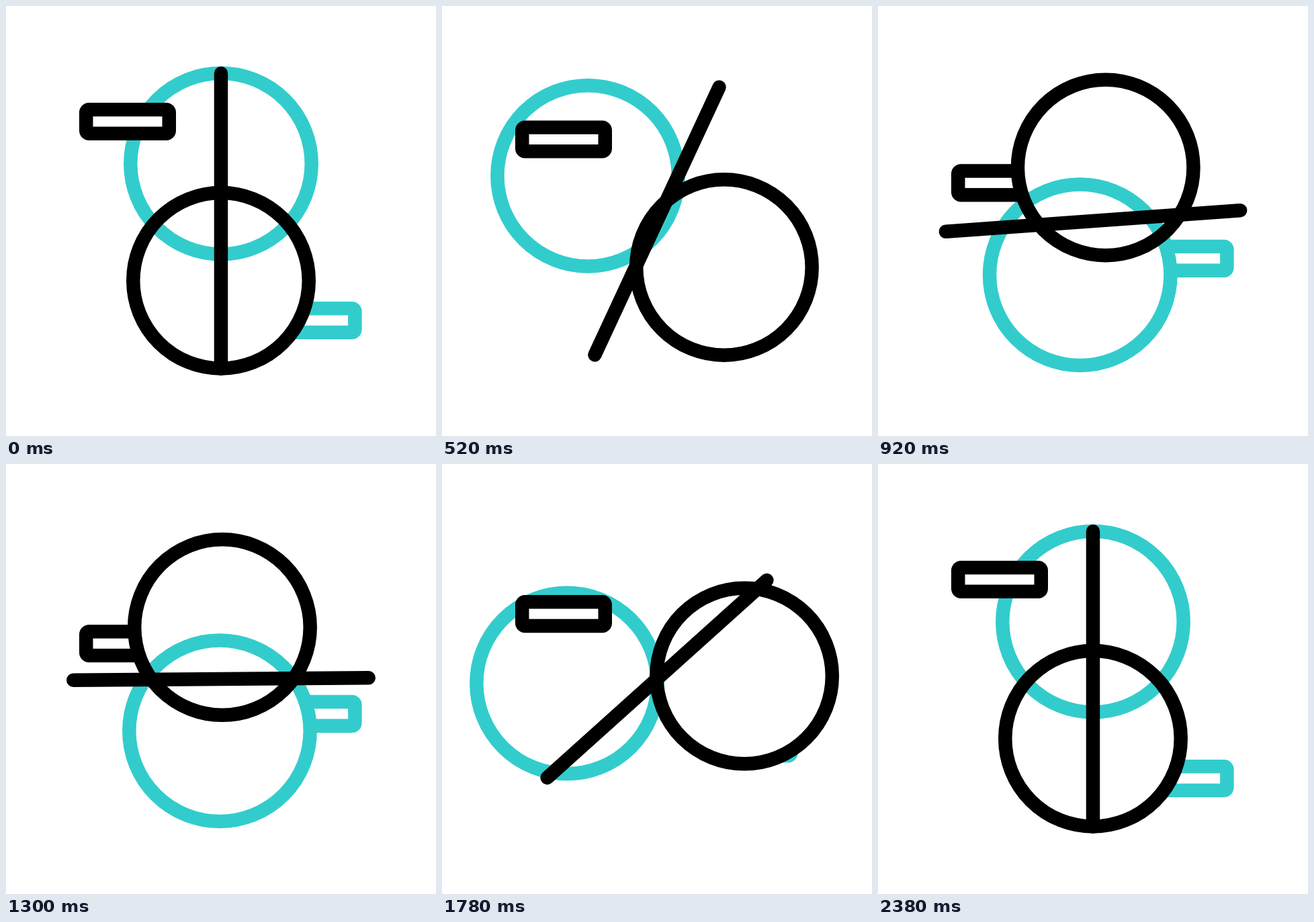
Write an HTML page with a canvas that moves like this. It is 640 px wide and 640 px high and loops after 2400 ms.

```html
<!DOCTYPE html>
<html lang="en">
<head>
<meta charset="utf-8">
<title>Swinging circles</title>
<style>
  html, body { margin: 0; width: 100%; height: 100%; overflow: hidden; background: #fff; }
  canvas { display: block; width: 640px; height: 640px; }
</style>
</head>
<body>
<canvas id="stage" width="640" height="640"></canvas>
<script>
const ctx = document.getElementById('stage').getContext('2d');
const TEAL = '#33cccc', BLACK = '#000', WHITE = '#fff';
const LOOP = 2400, STEP = 20, TURN = 1200, REST = 2380;
const STROKE = 20.5, CENTER = 320, TAU = Math.PI * 2;

const mix = (a, b, k) => a + (b - a) * k;

// Cubic bezier easing (.75, 0, .25, 1), solved by bisection.
function ease(x) {
  let lo = 0, hi = 1;
  for (let i = 0; i < 30; i++) {
    const t = (lo + hi) / 2, u = 1 - t;
    const bx = 2.25 * u * u * t + 0.75 * u * t * t + t * t * t;
    if (bx < x) lo = t; else hi = t;
  }
  return lo * lo * (3 - 2 * lo);
}

function progress(ms) {
  if (ms <= TURN) return ease(ms / TURN);
  return 1 - ease(Math.min(1, (ms - TURN) / (REST - TURN)));
}

// A disc swings half a turn about a point on its rim while that point slides.
function swing(radius, fromY, toY, side, k) {
  const angle = Math.PI * k;
  return {
    x: CENTER + side * radius * Math.sin(angle),
    y: mix(fromY, toY, k) + side * radius * Math.cos(angle),
    r: radius
  };
}

function fillDisc(c) {
  ctx.beginPath();
  ctx.arc(c.x, c.y, c.r, 0, TAU);
  ctx.fillStyle = WHITE;
  ctx.fill();
}

function strokeRing(c, color) {
  ctx.beginPath();
  ctx.arc(c.x, c.y, c.r, 0, TAU);
  ctx.strokeStyle = color;
  ctx.stroke();
}

function drawBar(x, midY, color) {
  const w = 144, h = 56.2, y = midY - h / 2;
  ctx.beginPath();
  ctx.roundRect(x, y, w, h, 14.5);
  ctx.fillStyle = color;
  ctx.fill();
  ctx.fillStyle = WHITE;
  ctx.fillRect(x + STROKE, y + STROKE, w - 2 * STROKE, h - 2 * STROKE);
}

function drawLine(k) {
  const angle = k * Math.PI / 2, half = 219.75;
  const dx = half * Math.sin(angle), dy = half * Math.cos(angle);
  ctx.beginPath();
  ctx.moveTo(CENTER + dx, CENTER - dy);
  ctx.lineTo(CENTER - dx, CENTER + dy);
  ctx.strokeStyle = BLACK;
  ctx.stroke();
}

function draw(ms) {
  const k = progress(ms);
  const tealDisc = swing(134.7, 369.45, 262.1, -1, k);
  const blackDisc = swing(130.75, 278, 374.25, 1, k);

  ctx.fillStyle = WHITE;
  ctx.fillRect(0, 0, 640, 640);
  ctx.lineWidth = STROKE;
  ctx.lineCap = 'round';

  drawBar(385.6, mix(468, 371.4, k), TEAL);
  fillDisc(tealDisc);
  fillDisc(blackDisc);
  strokeRing(tealDisc, TEAL);

  // The black bar only shows outside the black disc.
  ctx.save();
  ctx.beginPath();
  ctx.rect(0, 0, 640, 640);
  ctx.arc(blackDisc.x, blackDisc.y, blackDisc.r, 0, TAU);
  ctx.clip('evenodd');
  drawBar(109, mix(172, 267.7, k), BLACK);
  ctx.restore();

  strokeRing(blackDisc, BLACK);
  drawLine(k);
}

function tick() {
  draw(Math.floor(performance.now() % LOOP / STEP) * STEP);
  requestAnimationFrame(tick);
}
tick();
</script>
</body>
</html>
```
